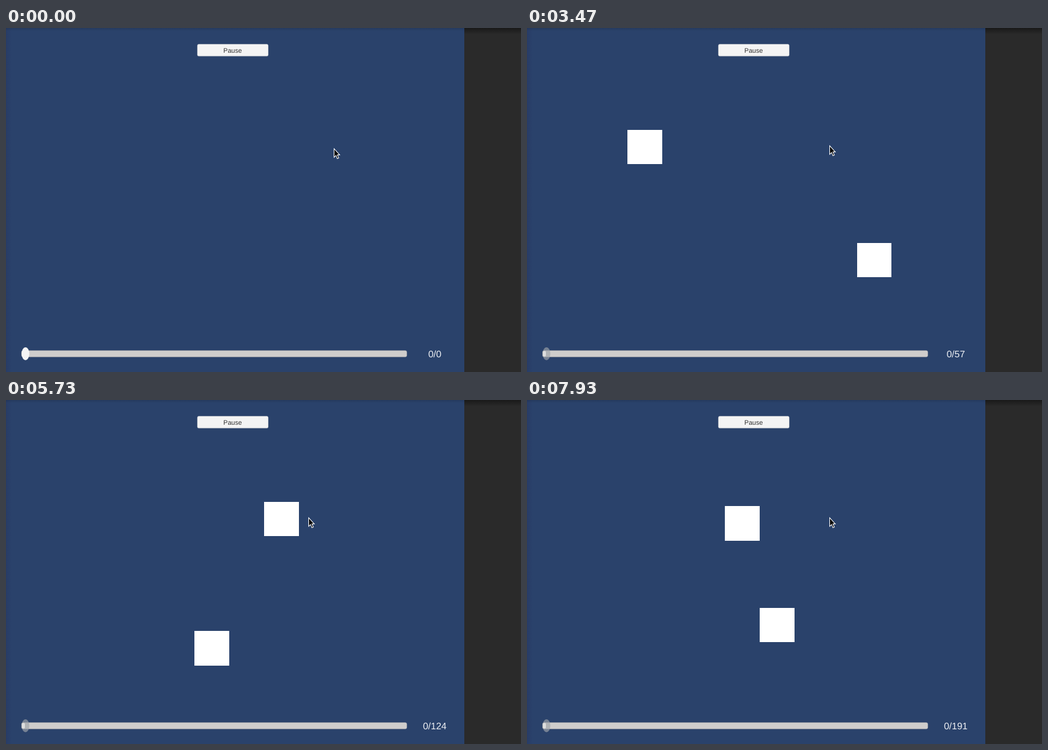
Animation of 872 by 584 pixels, one loop 8 s. Source, as an HTML page:

```html
<!DOCTYPE html>
<html lang="en">
<head>
<meta charset="utf-8">
<style>
  html, body { margin: 0; width: 100%; height: 100%; overflow: hidden; background: #2a2a2a; }
  svg { display: block; width: 872px; height: 584px; }
  text { font-family: "Liberation Sans", Arial, sans-serif; text-anchor: middle; text-rendering: geometricPrecision; }
</style>
</head>
<body>
<svg viewBox="0 0 872 584">
  <defs>
    <linearGradient id="topShade" x2="0" y2="1">
      <stop offset="0" stop-color="#000" stop-opacity=".4"/>
      <stop offset="1" stop-color="#000" stop-opacity="0"/>
    </linearGradient>
    <linearGradient id="leftShade">
      <stop offset="0" stop-color="#222a58" stop-opacity=".25"/>
      <stop offset="1" stop-color="#222a58" stop-opacity="0"/>
    </linearGradient>
  </defs>

  <rect width="776" height="584" fill="#2a426b"/>
  <rect width="10" height="584" fill="url(#leftShade)"/>
  <rect width="776" height="5" fill="url(#topShade)" opacity=".3"/>
  <rect x="776" width="96" height="584" fill="#2a2a2a"/>
  <rect x="776" width="96" height="11" fill="url(#topShade)"/>

  <rect x="324" y="27.5" width="120" height="20.3" rx="2.5" fill="#f4f4f4" stroke="#b9bcc2" stroke-width=".5"/>
  <text x="383.7" y="41.8" font-size="11" fill="#323232">Pause</text>

  <g id="squares" fill="#fff" shape-rendering="crispEdges">
    <rect x="-29.3" y="-29.3" width="58.6" height="58.6"/>
    <rect x="-29.3" y="-29.3" width="58.6" height="58.6"/>
  </g>

  <rect x="26.2" y="547.6" width="652.6" height="11" rx="3" fill="#cfcdcc" stroke="#8f8f93" stroke-opacity=".5" stroke-width=".6"/>
  <ellipse id="handle" cx="33" cy="553" rx="6.5" ry="11"/>
  <rect id="fill" x="27" y="548.2" width="5" height="9.6" rx="2" fill="#dedede"/>
  <text id="counter" x="726" y="558.5" font-size="16" fill="#eef0f4"></text>

  <path id="cursor" d="M.5 .5V14.9L3.7 11.9L6 17.2L8.4 16.2L6.1 10.9H10Z" fill="#000" stroke="#fff" stroke-width="1.1"/>
</svg>
<script>
const LOOP = 8000, FRAME = 1000 / 15;
const GAME_START = 19, TICK_OFFSET = 47, POINTER_FRAMES = 13;
const STEP = 3.92; // pixels a square moves per tick

// Held keys and how many ticks each is held; W waits
const KEYS = { L: [-1, 0], R: [1, 0], U: [0, -1], D: [0, 1], W: [0, 0] };
const players = [
  { x: 90, y: 292, firstTick: 6, moves: "R16 U23 R84 W1 D46 L15" },
  { x: 678, y: 292, firstTick: 8, moves: "L23 D32 DL1 L44 W1 L20 U54 R8" }
];

const $ = id => document.getElementById(id);
const squares = [...$("squares").children];
const place = (node, x, y) => node.setAttribute("transform", `translate(${x} ${y})`);

function positionAt(tick, { x, y, firstTick, moves }) {
  let left = Math.max(0, tick - firstTick);
  for (const move of moves.split(" ")) {
    const [, keys, length] = move.match(/(\D+)(\d+)/);
    const held = Math.min(left, +length);
    for (const key of keys) {
      x += KEYS[key][0] * held * STEP;
      y += KEYS[key][1] * held * STEP;
    }
    left -= held;
  }
  return [x, y];
}

function pointerAt(frame) {
  const k = Math.min(1, frame / POINTER_FRAMES);
  const eased = k * k * (3 - 2 * k);
  return [555 - 43 * eased, 204.5 - 5 * eased + 3 * Math.sin(Math.PI * k)];
}

function draw(time) {
  const frame = Math.floor((time % LOOP + 5) / FRAME);
  const tick = 2 * frame - TICK_OFFSET;
  const playing = frame >= GAME_START;
  const lag = frame >= 77 && frame < 110 ? 1 : 0;

  $("squares").style.display = $("fill").style.display = playing ? "" : "none";
  $("handle").setAttribute("fill", playing ? "rgba(160,165,170,.65)" : "#f4f4f4");
  $("counter").textContent = "0/" + Math.max(0, tick - lag);
  squares.forEach((square, i) => place(square, ...positionAt(tick, players[i])));
  place($("cursor"), ...pointerAt(frame));
}

function run(now) {
  draw(now);
  requestAnimationFrame(run);
}
draw(0);
requestAnimationFrame(run);
</script>
</body>
</html>
```
